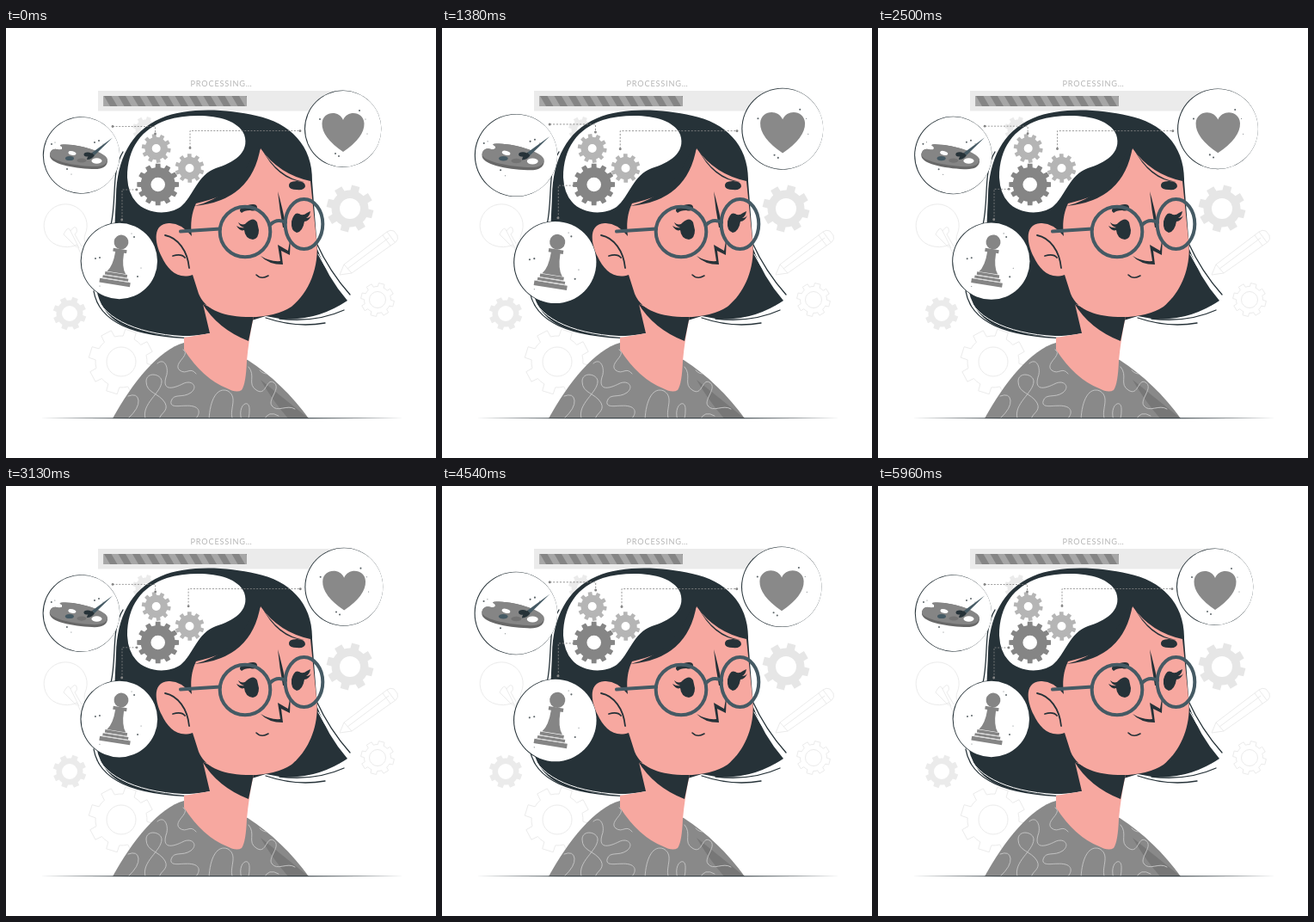
Write an HTML page that moves like this. It is 500x500 px and loops after 6 s.

```html
<!DOCTYPE html>
<html lang="en">
<head>
<meta charset="utf-8">
<style>
html, body { margin: 0; width: 100%; height: 100%; overflow: hidden; background: #fff; }
svg { display: block; width: 100vw; height: 100vh; }
.label { font: 9.2px Lato, "Open Sans", sans-serif; letter-spacing: .8px; fill: #b5b5b5; }
.line { fill: none; stroke-linecap: round; stroke-linejoin: round; }
.ink { stroke: #263238; }
.faint { fill: none; stroke: #ebebeb; stroke-linejoin: round; }
.link { fill: none; stroke: #858585; stroke-width: .8; stroke-dasharray: 2 1.6; }
</style>
</head>
<body>
<svg viewBox="0 0 500 500" xmlns="http://www.w3.org/2000/svg">
  <defs>
    <clipPath id="barClip"><rect x="113.5" y="79" width="166.5" height="12"/></clipPath>
    <clipPath id="shirtClip"><use href="#shirt"/></clipPath>
  </defs>
  <rect width="500" height="500" fill="#fff"/>

  <!-- Background -->
  <g id="backGears"></g>
  <g class="faint">
    <path d="M82 252C75 256 60 256 51 247A25 25 0 1 1 92 240C90 246 92 251 95 257L87 262Z"/>
    <path d="M85 256L75 236Q73 231 70 235T67 240L82 255M75 236Q80 229 82 233T80 240L88 254M87 262L96 256L101 264L92 269Z"/>
    <path d="M388 287L393 275L443 237Q447 234 451 236L455 241Q457 246 453 249L402 285ZM393 275L402 285M397 280L445 244M438 241L447 253M443 237L452 249"/>
  </g>
  <text class="label" x="214.5" y="68">PROCESSING…</text>
  <rect x="107" y="73" width="286" height="23.5" fill="#ebebeb"/>
  <g clip-path="url(#barClip)">
    <rect x="113" y="79" width="168" height="12" fill="#858585"/>
    <path id="stripes" fill="#a6a6a6"/>
  </g>

  <!-- Body -->
  <path id="shirt" fill="#898989" d="M124 454C147 412 178 374 207 366L281 386C309 404 332 427 352 454Z"/>
  <g clip-path="url(#shirtClip)">
    <path fill="#777" d="M296 409L352 454H328Q309 432 296 409Z"/>
    <path class="line" stroke="#c2c2c2" d="M142 428Q153 424 154 433T142 454M162 454C157 437 181 424 181 411C181 402 163 399 163 411C163 425 178 424 185 436C190 446 178 448 178 456M176 390C185 382 190 397 186 406C181 424 197 418 205 414C216 408 224 417 215 424C205 431 195 424 192 434C190 444 207 437 218 440C229 443 223 454 218 456M206 374C216 380 193 390 202 398C210 404 214 393 221 402M236 456C237 431 246 417 258 422C271 430 258 445 264 456M274 456C268 438 284 429 283 445Q283 453 281 456M282 394C291 404 280 414 291 421C303 429 302 407 311 412C321 418 304 432 309 439C315 448 327 437 336 443M295 398Q299 403 306 402M300 456Q305 444 317 451"/>
  </g>
  <path fill="#263238" d="M128 195C129 153 145 120 180 105C211 92 255 94 291 102C330 110 357 137 356 178L362 257Q373 289 397 317Q352 347 302 335L237 355C202 362 157 358 133 344Q110 331 105 303Q119 269 126 240Z"/>
  <g class="line ink">
    <path stroke-width="1.3" d="M136 144C122 167 129 198 122 229M102 306C108 341 145 359 222 361M361 250Q376 283 400 310M302 337Q337 349 371 343M318 338Q360 343 393 328"/>
    <path stroke="#fff" stroke-width="1" d="M105 311C114 339 156 358 218 359M363 263Q377 290 398 312"/>
  </g>
  <path fill="#f7a8a0" d="M207 360L237 355L229 321L288 335Q282 364 280 387Q279 414 274 421Q268 425 257 419Q229 408 207 374Z"/>
  <path fill="#263238" d="M228 320Q254 335 288 335L282 364Q246 350 228 320Z"/>
  <path fill="#f7a8a0" d="M296 140Q317 170 354 178L361 246C365 278 352 308 332 324Q312 337 279 336C249 335 231 326 224 309L217 287C200 293 188 281 181 266C172 248 171 228 189 227Q203 226 216 242C214 228 216 214 221 204C264 194 282 179 296 140Z"/>
  <path fill="#263238" d="M296 138Q286 201 219 207Q266 196 290 143ZM296 138Q316 174 347 179Q316 178 296 138Z"/>
  <path class="line ink" stroke-width="1.8" d="M185 241C200 244 211 259 213 279M194 265Q204 262 208 267"/>

  <!-- Face -->
  <g fill="#263238">
    <path d="M272 213Q271 208 281 206Q291 203 292 208Q292 214 284 212Q277 212 274 215ZM329 184Q328 178 338 178Q348 178 348 184Q347 189 338 188Q330 188 329 184Z"/>
    <path d="M294 235Q294 245 287 246Q278 245 277 235Q272 237 268 230Q273 233 277 232Q272 231 270 226Q276 231 280 226Q288 219 292 226ZM347 225Q345 237 338 238Q331 236 332 225Q335 213 341 216Q345 219 350 215L354 213Q353 219 349 221Q353 221 355 218Q352 225 347 225Z"/>
    <path d="M316 190Q321 207 326 232L322 232Q318 211 316 190ZM296 265Q307 272 319 271L316 252L328 259L331 242L330 264L320 259L322 275Q305 275 296 265Z"/>
  </g>
  <path class="line ink" stroke-width="1.6" d="M291 287Q297 293 305 288"/>
  <g class="line" stroke="#455a64" stroke-width="4">
    <circle cx="278" cy="237" r="29.3"/>
    <ellipse cx="346.5" cy="228" rx="21.8" ry="29"/>
    <path d="M307 229Q315 221 325 226M203 236.5L249 233.5"/>
  </g>

  <!-- Mind -->
  <path fill="#fff" d="M141 174C141 139 158 117 187 107C218 98 267 100 277 124C284 145 264 157 244 163C222 171 218 196 203 208C187 219 161 215 151 202Q142 192 141 174Z"/>
  <g id="mindGears"></g>
  <path fill="#263238" d="M40 453.7L150 453.2H355L462 453.7L355 454.3H150Z"/>

  <!-- Bubbles -->
  <g id="art">
    <g class="disc" data-x="87.5" data-y="148"></g>
    <path class="link" d="M124 114.5H173.5V123"/>
    <g class="dots" data-at="124,114.5 173.5,123"></g>
    <path fill="#686868" d="M51 147Q52 140 59 141Q67 143 65 138Q59 135 69 135.5C91 136 118 146 118 155Q117 165 100 164C78 163 49 158 51 147Z"/>
    <path fill="#858585" d="M51 146Q53 140 59 141Q67 143 65 138Q59 135 69 135.5C91 136 118 146 118 153Q117 162 100 161C78 160 49 154 51 146Z"/>
    <g fill="#fff"><ellipse cx="105.500" cy="154.500" rx="6" ry="3.200"/><ellipse cx="77" cy="145.500" rx="4.600" ry="2.300" transform="rotate(14 77 145.500)"/></g>
    <ellipse cx="74" cy="151.500" rx="5" ry="2.600" fill="#455a64"/>
    <ellipse cx="88" cy="154" rx="5.500" ry="2.600" fill="#737373"/>
    <ellipse cx="95" cy="147" rx="4.500" ry="2.600" fill="#263238"/>
    <path fill="#455a64" d="M124 127.500L103 148L100 145Z"/>
    <path fill="#263238" d="M103 148L100 145Q95 148 94 153Q100 153 103 148Z"/>
    <g class="specks" data-at="53,135 103,133 108,131 71,164 57,133 76,170 113,135"></g>
  </g>
  <g id="chess">
    <g class="disc" data-x="131.3" data-y="271"></g>
    <path class="link" d="M152 188H135V223"/>
    <g class="dots" data-at="152,188 134.7,223"></g>
    <g transform="translate(134 249) rotate(9)" fill="#858585">
      <circle r="8.400"/>
      <path d="M-8 8H8V12H5Q5 29 11 36H-11Q-5 29 -5 12H-8Z"/>
      <path d="M-13 36.500H13V40H-13ZM-15 41H15V44H-15ZM-18 45H18V50H-18Z"/>
      <path d="M-12 40.500H12M-16 44.500H16" stroke="#d5d5d5" stroke-width=".8"/>
    </g>
    <g class="specks" data-at="104,268 109,267 149,243 153,289 146,239 157,279 109,300"></g>
  </g>
  <g id="heart">
    <g class="disc" data-x="391.7" data-y="117.3"></g>
    <path class="link" d="M214 139V119.500H342"/>
    <g class="dots" data-at="214,139.500 342,119.700"></g>
    <path fill="#898989" d="M392 144Q367 127 367.500 111C368 97 387 95 392 107C397 95 416 97 416.500 111Q417 127 392 144Z"/>
    <g class="specks" data-at="411,96 365,106 387,149 383,146 418,106 420,123"></g>
  </g>
</svg>
<script>
const LOOP = 6000;
const byId = id => document.getElementById(id);

// Toothed wheel with a round hole, as one even-odd path
function gearPath(x, y, outer, root, hole, teeth, turn = 0) {
  const step = 2 * Math.PI / teeth;
  const at = (r, a) => `${(x + r * Math.cos(a)).toFixed(2)} ${(y + r * Math.sin(a)).toFixed(2)}`;
  let d = '';
  for (let i = 0; i < teeth; i++) {
    const a = i * step + turn;
    d += `${i ? 'L' : 'M'}${at(root, a - step * .29)}L${at(outer, a - step * .22)}` +
      `L${at(outer, a + step * .22)}L${at(root, a + step * .29)}` +
      `A${root} ${root} 0 0 1 ${at(root, a + step * .71)}`;
  }
  return d + `ZM${x - hole} ${y}a${hole} ${hole} 0 1 0 ${2 * hole} 0a${hole} ${hole} 0 1 0 ${-2 * hole} 0Z`;
}
const filled = (color, ...gear) => `<path fill="${color}" fill-rule="evenodd" d="${gearPath(...gear)}"/>`;
const outlined = (...gear) => `<path class="faint" d="${gearPath(...gear)}"/>`;

byId('backGears').innerHTML =
  filled('#ebebeb', 74, 332, 19.5, 15.5, 9, 8, .35) +
  filled('#e6e6e6', 400, 210, 27.5, 21.5, 12, 8, .25) +
  filled('#ebebeb', 162, 118, 15, 11.5, 5, 8, .3) +
  outlined(134, 388, 38, 30, 17, 8, .3) +
  outlined(432, 316, 19.5, 15.5, 9.5, 8, .25);
byId('mindGears').innerHTML =
  filled('#858585', 176.7, 182, 24.5, 20, 8.3, 12) +
  filled('#b5b5b5', 174.7, 140, 17, 13.2, 5, 10, .15) +
  filled('#b5b5b5', 213.5, 163, 17, 13.2, 5, 10, .3);

let stripes = '';
for (let x = 106; x < 285; x += 16.5) stripes += `M${x} 79h8l7 12h-8Z`;
byId('stripes').setAttribute('d', stripes);

// Rim that thins out towards the right
for (const disc of document.querySelectorAll('.disc')) {
  const { x, y } = disc.dataset;
  disc.innerHTML = `<circle cx="${x}" cy="${y}" r="44.7" fill="#263238"/>` +
    `<circle cx="${+x + .5}" cy="${y}" r="44.2" fill="#fff"/>`;
}
function scatter(selector, color, radius) {
  for (const group of document.querySelectorAll(selector)) {
    group.innerHTML = group.dataset.at.split(' ').map((point, i) => {
      const [x, y] = point.split(',');
      return `<circle cx="${x}" cy="${y}" r="${radius(i)}" fill="${color}"/>`;
    }).join('');
  }
}
scatter('.dots', '#858585', () => 1.4);
scatter('.specks', '#5e666a', i => i < 4 ? 1 : .5);

// Growth of a bubble as [seconds, share of the full swell]
const early = [[0, 0], [.4, .45], [.79, .95], [.95, 1], [1.29, .82], [1.96, .4], [2.5, .1], [2.9, 0],
  [3.13, .03], [3.75, .39], [3.92, .57], [4.22, 1], [4.54, .8], [5.04, .28], [5.62, 0], [6, 0]];
const late = [[0, 0], [.66, 0], [.79, .13], [1.25, .45], [1.7, 1], [1.96, .81], [2.54, .47], [3.13, .17],
  [3.4, 0], [3.95, 0], [4.38, .22], [4.54, .45], [4.95, 1], [5.1, .9], [5.67, .3], [5.96, 0], [6, 0]];

function sample(keys, t) {
  const i = keys.findIndex(key => key[0] > t);
  const [t0, v0] = keys[i - 1], [t1, v1] = keys[i];
  return v0 + (v1 - v0) * (t - t0) / (t1 - t0);
}
function swell(id, x, y, amount) {
  byId(id).setAttribute('transform',
    `translate(${x} ${y}) scale(${1 + .1 * amount}) translate(${-x} ${-y})`);
}
function draw(ms) {
  const t = ms % LOOP / 1000;
  const first = sample(early, t);
  swell('art', 108.5, 148, first);
  swell('chess', 131.3, 251.5, first);
  swell('heart', 325, 117.5, sample(late, t));
}

const start = performance.now();
function tick() {
  draw(performance.now() - start);
  requestAnimationFrame(tick);
}
draw(0);
requestAnimationFrame(tick);
</script>
</body>
</html>
```
